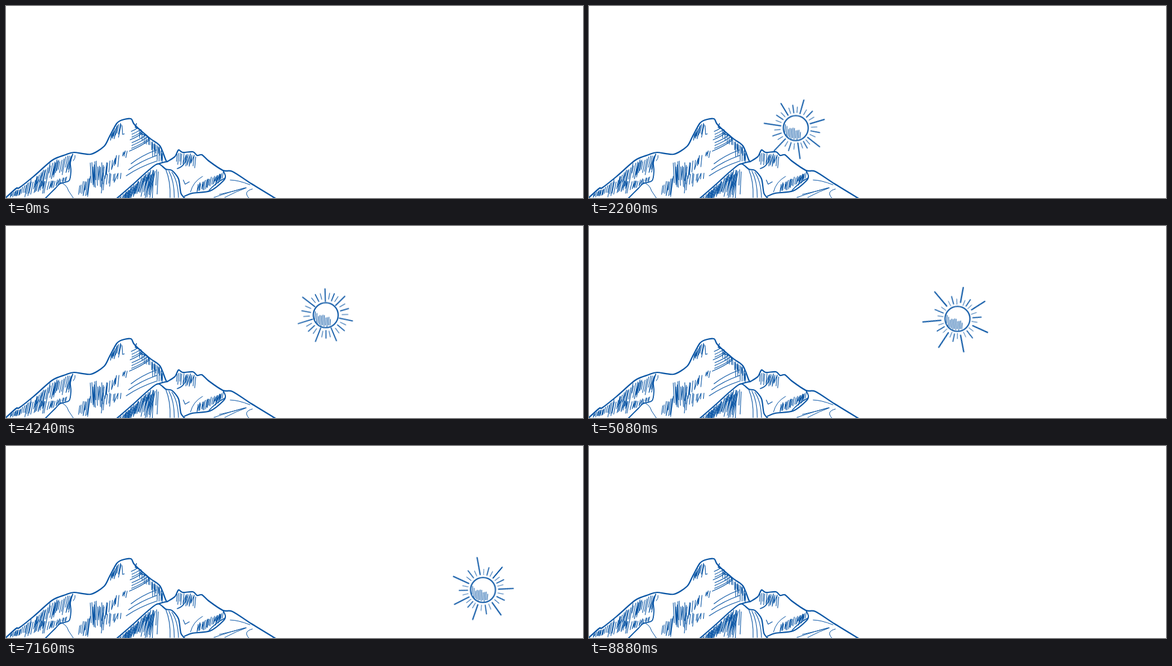
Recreate the animation shown at these times as an HTML page. Size 960x320 px, loop 10000 ms.

```html
<!DOCTYPE html>
<html lang="en">
<head>
<meta charset="utf-8">
<title>Sun over the mountains</title>
<style>
  html, body { margin: 0; width: 100%; height: 100%; overflow: hidden; background: #fff; }
  svg { display: block; width: 960px; height: 320px; }
  .ink { fill: none; stroke: #0a56a5; stroke-linecap: round; stroke-linejoin: round; }
  .solid { fill: #fff; stroke: none; }

  /* 25 poses a second */
  .orbit { animation: orbit 10s steps(250) -4ms infinite; }
  .upright { animation: upright 10s steps(250) -4ms infinite; }
  .long { animation: reach 10s steps(30) -4ms infinite; }
  .short { animation: shrink 10s steps(30) -4ms infinite; }
  @keyframes orbit { from { transform: rotate(-62.43deg); } to { transform: rotate(80.87deg); } }
  @keyframes upright { from { transform: rotate(62.43deg); } to { transform: rotate(-80.87deg); } }
  @keyframes reach {
    0%, 100% { transform: scale(1); }
    5.6%, 29.6%, 53.6%, 77.6% { transform: scale(1.131); }
    17.6%, 41.6%, 65.6%, 89.6% { transform: scale(.869); }
  }
  @keyframes shrink {
    0%, 100% { transform: scale(1); }
    5.6%, 29.6%, 53.6%, 77.6% { transform: scale(.91); }
    17.6%, 41.6%, 65.6%, 89.6% { transform: scale(1.07); }
  }
</style>
</head>
<body>
<svg viewBox="0 0 960 320" aria-label="A sun crossing the sky behind mountains">
  <g transform="translate(543.3 536.4)">
    <g class="orbit">
      <g transform="translate(0 -388)" class="ink">
        <g class="long" id="long" stroke-width="2"></g>
        <g id="mid" stroke-width="1.6"></g>
        <g class="short" id="short" stroke-width="1"></g>
        <g class="upright" id="disc"><circle r="20.7" stroke-width="2.1"/></g>
      </g>
    </g>
  </g>
  <g id="land" class="ink"></g>
</svg>
<script>
const $ = id => document.getElementById(id);

let seed = 11;
const rand = () => (seed = (seed * 16807) % 2147483647) / 2147483647;
const pick = (a, b) => a + (b - a) * rand();

function draw(d, width, parent = $('land')) {
  const p = document.createElementNS('http://www.w3.org/2000/svg', 'path');
  p.setAttribute('d', d);
  if (width) p.setAttribute('stroke-width', width);
  else p.setAttribute('class', 'solid');
  parent.appendChild(p);
}

// Smooth curve through every point of a flat x, y list
function curve(v) {
  const at = i => {
    const k = 2 * Math.min(v.length / 2 - 1, Math.max(0, i));
    return [v[k], v[k + 1]];
  };
  let d = `M${at(0)}`;
  for (let i = 0; i < v.length / 2 - 1; i++) {
    const [a, b, c, e] = [at(i - 1), at(i), at(i + 1), at(i + 2)];
    d += `C${b.map((n, j) => n + (c[j] - a[j]) / 7)} ${c.map((n, j) => n - (e[j] - b[j]) / 7)} ${c}`;
  }
  return d;
}

// Height of a line, lowered by a drop, as a function of x
const below = (v, drop) => x => {
  let i = 0;
  while (i < v.length - 4 && x > v[i + 2]) i += 2;
  return v[i + 1] + (x - v[i]) / (v[i + 2] - v[i]) * (v[i + 3] - v[i + 1]) + drop;
};
const slant = (x0, y0, x1, y1) => below([x0, y0, x1, y1], 0);

// Loose pen strokes between two edges, some joined into a zigzag
function hatch(x0, x1, top, bottom, gap, lean, width = 1.1) {
  let d = '';
  for (let x = x0; x <= x1; x += gap * pick(.5, 1.5)) {
    const a = top(x), h = bottom(x) - a;
    const y0 = a + h * pick(0, .2), y1 = a + h * pick(.55, 1);
    d += `${d && rand() < .25 ? 'L' : 'M'}${x + lean * (y0 - a)},${y0}L${x + lean * (y1 - a)},${y1}`;
  }
  draw(d, width);
}

/* Sun */
const ray = (deg, from, to) => {
  const a = deg * Math.PI / 180, c = Math.cos(a), s = Math.sin(a);
  return `M${from * c},${from * s}L${to * c},${to * s}`;
};
const angles = [270, 317, 374, 429, 473, 524.5, 579.5, 630];
for (let i = 0; i < 7; i++) {
  const deg = angles[i], gap = angles[i + 1] - deg;
  draw(ray(deg, 26, 49.5 + i * .9), 2, $('long'));
  draw(ray(deg + gap / 2, 25.5, 38.5 + i % 3), 1.6, $('mid'));
  draw(ray(deg + gap / 4, 25.5, 35) + ray(deg + gap * .75, 25.5, 35), 1, $('short'));
}
let shade = '';
for (let x = -18; x < 9; x += 2.5) {
  shade += `M${x + .8},${pick(-6, 1) + (x + 18) * .35}L${x},${Math.sqrt(400 - x * x) - pick(0, 4)}`;
}
draw(shade, 1.1, $('disc'));

/* Outlines */
const west = [-2, 321, 17, 304, 22, 303, 46, 284, 77, 257, 99, 248, 113, 244, 141, 247, 163, 234, 172, 218,
  184, 196, 193, 190, 208, 188, 214, 198, 240, 221, 256, 233, 266, 257, 269, 259];
const east = [269, 259, 281, 251, 287, 240, 294, 244, 311, 243, 318, 249, 326, 248, 337, 258, 361, 274,
  377, 276, 408, 296, 449, 321];
const front = [184, 321, 207, 301, 237, 274, 253, 263, 266, 272, 276, 274, 287, 288, 291, 312, 298, 321];
const foot = [65, 321, 82, 304, 90, 296, 105, 291, 108, 275, 107, 260, 111, 247];
const ledge = [297, 317, 310, 312, 340, 308, 362, 291, 365, 283, 361, 274];

/* Back range */
const range = curve(west) + curve(east).replace('M', 'L');
draw(range + 'V340H-2Z');
draw(range, 2.2);
draw(curve(foot), 1.8);
draw(curve(ledge), 1.9);
draw('M90,294Q101,297 104,308L112,320M112,258Q116,253 115,249', 1);

hatch(52, 111, below(west, 2), below(west, 34), 2.3, -.2);
hatch(8, 44, below(west, 2), () => 319, 2.4, -.2);
hatch(46, 68, () => 289, () => 314, 2.2, -.2);
hatch(72, 104, slant(72, 292, 104, 284), slant(72, 308, 104, 293), 2.7, -.25);
hatch(140, 161, () => 258, slant(140, 310, 161, 312), 2, .05);
hatch(123, 142, slant(123, 297, 142, 280), () => 319, 2.5, -.13);
hatch(162, 190, slant(162, 265, 190, 244), slant(162, 293, 190, 270), 3.2, -.1);
hatch(162, 192, () => 278, slant(162, 312, 192, 288), 3.4, -.1);
hatch(196, 205, () => 240, () => 257, 2.6, -.2);
hatch(176, 193, below(west, 2), slant(176, 224, 193, 222), 2.3, -.2);
hatch(222, 262, below(west, 2), below(west, 18), 2.8, .04);
hatch(244, 261, below(west, 2), () => 262, 2.7, 0);

// Folds falling away from the summit
let folds = '';
for (let k = 0; k < 8; k++) {
  const x = 204 + pick(0, 7), y = 209 + k * 4.7, w = 11 + k * 3.2;
  folds += `M${x},${y}Q${x + w * .6},${y - w * .25} ${x + w},${y - w * .55}`;
}
for (let k = 0; k < 3; k++) {
  folds += `M${200 + 4 * k},${283 - 10 * k}Q${222 + k},${268 - 9 * k} ${252 - k},${258 - 9 * k}`;
}
draw(folds + 'M193,199L194,214L197,213', 1.1);
draw('M217,196L215,202L225,207L224,213L234,216L238,222', 1.5);

/* Second peak and right slope */
hatch(285, 318, below(east, 2), below(east, 25), 2.5, -.1);
draw('M285,271Q298,267 301,251', 1.5);
draw('M295,290L298,297L305,293', 1.1);
hatch(320, 363, slant(320, 295, 363, 275), slant(320, 312, 363, 294), 2.2, -.15);
draw('M338,307Q350,294 364,287', 1.4);

let creases = 'M307,310Q311,293 327,284M373,290Q386,290 406,298M410,305Q394,309 404,320';
for (let k = 0; k < 3; k++) creases += `M${346 + 9 * k},${319 - 5 * (k % 2)}Q${375 + 4 * k},309 ${398 + k},303`;
draw(creases, 1);

/* Front peak */
const near = curve(front);
draw(near + 'V340H184Z');
draw(near + 'M250,264Q259,261 269,259', 2.1);
hatch(190, 252, below(front, 2), () => 324, 2.7, -.2);
hatch(200, 240, below(front, 2), below(front, 26), 3.2, -.25);
hatch(238, 256, below(front, 2), () => 322, 4, -.05);
let ribs = '';
for (let k = 0; k < 3; k++) ribs += `M${266 + 5 * k},${273 + 2 * k}Q${274 + 6 * k},292 ${273 + 7 * k},319`;
draw(ribs, 1.1);
</script>
</body>
</html>
```
